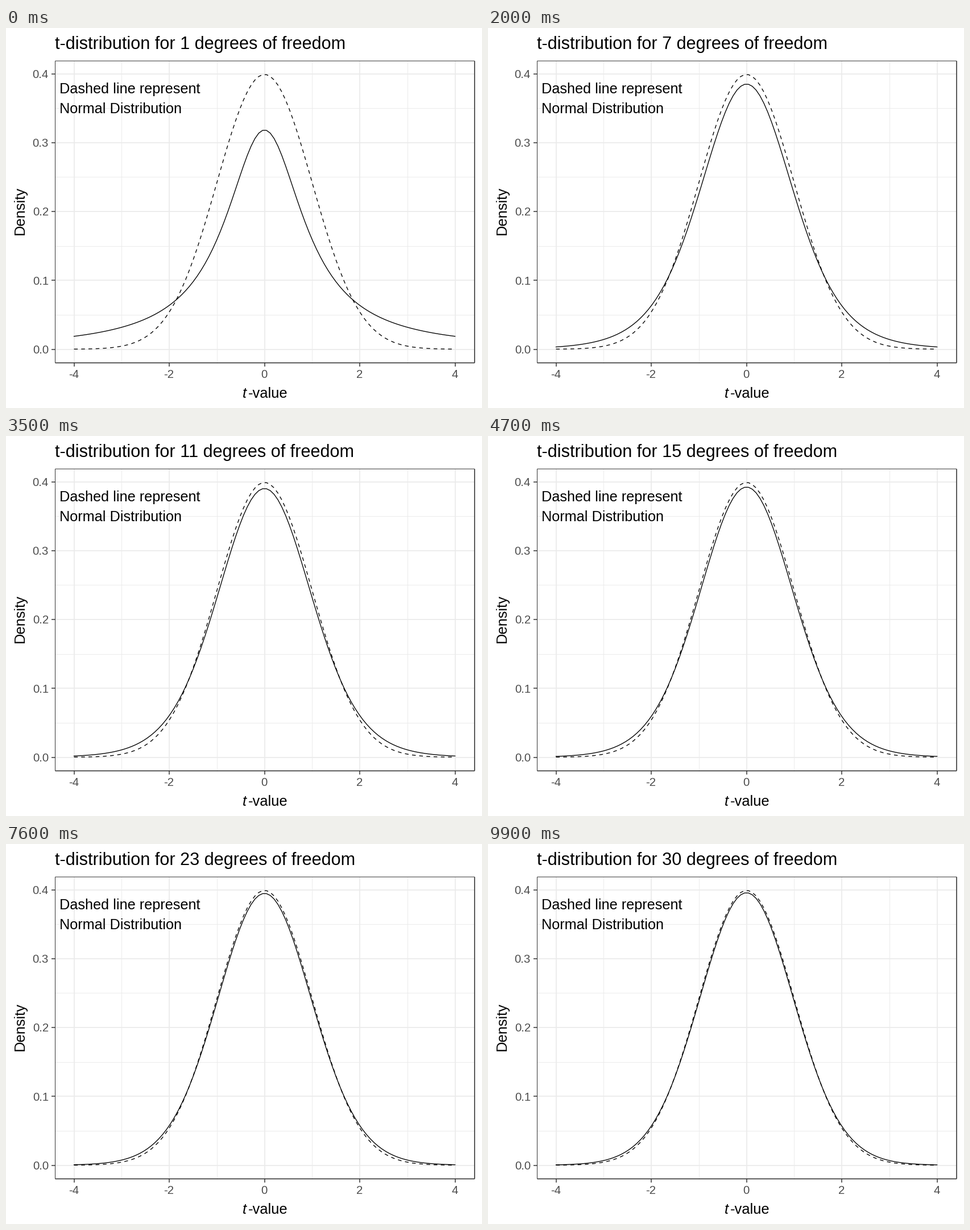
Animation, 837 px wide and 669 px high, one loop 10000 ms. Source, as a matplotlib script:

```python
from math import gamma, pi, sqrt

import matplotlib.pyplot as plt
import numpy as np
from matplotlib.animation import FuncAnimation

W, H, DPI = 837, 669, 72
FRAMES, MAX_DF = 100, 30
LEFT, RIGHT, TOP, BOTTOM = 86.5, 824, 58, 589.5
GRID, EDGE, LABEL = "#ebebeb", "#333333", "#4d4d4d"

plt.rcParams["font.family"] = "Liberation Sans"
fig = plt.figure(figsize=(W / DPI, H / DPI), dpi=DPI, facecolor="white")
ax = fig.add_axes([0, 0, 1, 1])
ax.set(xlim=(0, W), ylim=(H, 0))
ax.axis("off")


def px(x):
    return 454.6 + 83.75 * x


def py(d):
    return 565.5 - 1212.5 * d


def rule(x0, y0, x1, y1, color, width, z=1, snap=None):
    ax.plot([x0, x1], [y0, y1], color=color, lw=width, zorder=z,
            solid_capstyle="butt", snap=snap)


def text(x, y, s, size=25.5, va="baseline", **kw):
    return ax.text(x, y, s, fontsize=size, va=va, zorder=6, **kw)


def t_density(x, df):
    scale = gamma((df + 1) / 2) / (sqrt(df * pi) * gamma(df / 2))
    return scale * (1 + x**2 / df) ** (-(df + 1) / 2)


# Grid
for v in (-3, -1, 1, 3):
    rule(px(v), TOP, px(v), BOTTOM, GRID, 1)
for d in (0.05, 0.15, 0.25, 0.35):
    rule(LEFT, py(d), RIGHT, py(d), GRID, 1)
for v in (-4, -2, 0, 2, 4):
    rule(px(v), TOP, px(v), BOTTOM, GRID, 1.7, 2)
    rule(px(v), BOTTOM, px(v), BOTTOM + 6, EDGE, 1.5, 2)
    text(px(v) - 0.6, 616.5, str(v), 20.4, color=LABEL, ha="center")
for d in (0, 0.1, 0.2, 0.3, 0.4):
    rule(LEFT, py(d), RIGHT, py(d), GRID, 1.7, 2)
    rule(LEFT - 6, py(d), LEFT, py(d), EDGE, 1.5, 2)
    text(75, py(d) + 7.5, f"{d:.1f}", 20.4, color=LABEL, ha="right")

# Panel border
rule(LEFT, TOP, RIGHT, TOP, EDGE, 1, 5, False)
rule(LEFT, TOP, LEFT, BOTTOM, EDGE, 1, 5, False)
rule(RIGHT, TOP, RIGHT, BOTTOM, EDGE, 1.6, 5, False)
rule(LEFT, BOTTOM, RIGHT, BOTTOM, EDGE, 1.6, 5, False)

# Labels
title = text(86, 37, "", 30.6)
text(94, 114.5, "Dashed line represent", 25.25)
text(94, 150.5, "Normal Distribution", 25.25)
text(416, 651, "t", style="italic")
text(425.5, 651, "-value")
text(25, 321, "Density", va="center", ha="center", rotation=90)

# Curves
xs = np.linspace(-4, 4, 100)
normal = np.exp(-xs**2 / 2) / sqrt(2 * pi)
curves = np.array([t_density(xs, df) for df in range(1, MAX_DF + 1)])
keys = np.round(np.linspace(0, FRAMES - 1, MAX_DF))

style = dict(color="black", lw=1.35)
ax.plot(px(xs), py(normal), dashes=(6.5 / 1.35, 6.2 / 1.35),
        dash_capstyle="butt", zorder=3, **style)
line, = ax.plot(px(xs), py(curves[0]), zorder=4, **style)


def update(i):
    pos = np.interp(i, keys, np.arange(MAX_DF))
    lo = min(int(pos), MAX_DF - 2)
    mix = pos - lo
    line.set_ydata(py((1 - mix) * curves[lo] + mix * curves[lo + 1]))
    df = round(1 + (MAX_DF - 1) * i / (FRAMES - 1))
    title.set_text(f"t-distribution for {df} degrees of freedom")
    return line, title


anim = FuncAnimation(fig, update, frames=FRAMES, interval=100,
                     repeat=True, repeat_delay=0)
plt.show()
```
